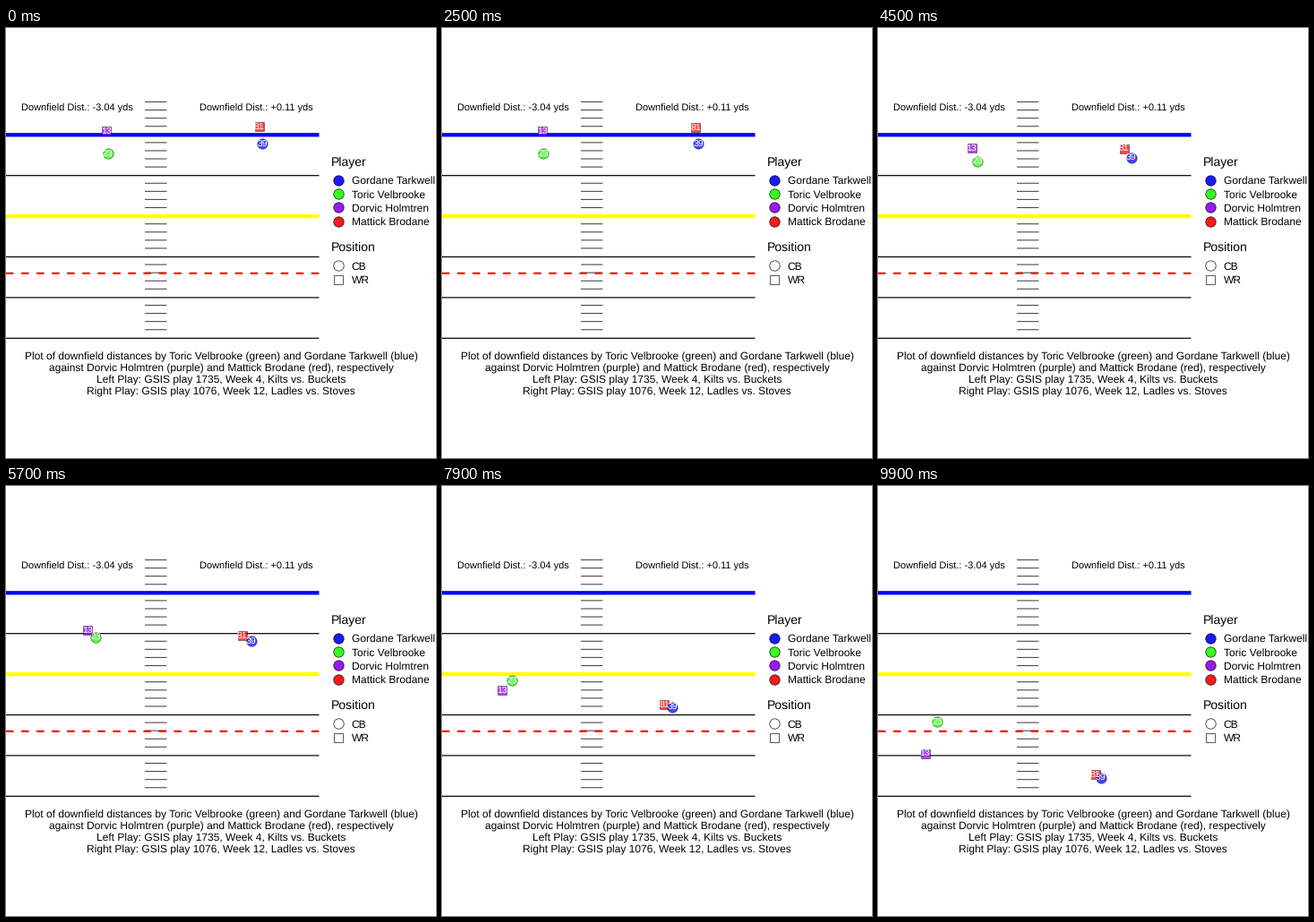
A matplotlib script that plays this animation: 480x480 px, repeating every 10000 ms.

```python
import numpy as np
import matplotlib.pyplot as plt
from matplotlib.animation import FuncAnimation
from matplotlib.colors import to_rgba

SIZE, DPI = 480, 80
PX = 72 / DPI  # points per pixel

plt.rcParams["font.family"] = "Liberation Sans"
plt.rcParams["text.hinting"] = "none"

COLORS = {"blue": "#0000ff", "green": "#21ff06", "purple": "#9000f0", "red": "#ff0000"}
NAMES = {
    "blue": "Gordane Tarkwell",
    "green": "Toric Velbrooke",
    "purple": "Dorvic Holmtren",
    "red": "Mattick Brodane",
}

# Way points at these steps of 200 ms; everyone waits for the first one
KEYS = np.array([10, 17, 23, 36, 50])
ROUTES = [
    ("purple", "13", "s", [(112, 115), (111, 118.5), (104.5, 134), (74, 202), (52.5, 298.5)]),
    ("green", "23", "o", [(113.7, 140), (112.5, 140.5), (111, 148.5), (84, 199.5), (66, 263)]),
    ("red", "81", "s", [(282.7, 110.2), (282.5, 116.5), (274.5, 134.5), (251.8, 215.5), (242.8, 322)]),
    ("blue", "39", "o", [(286, 129.3), (286.2, 131), (282.5, 144.5), (261.7, 218), (248.5, 325.5)]),
]


def route(points, step):
    """Smooth run through the way points, starting from rest."""
    p = np.array(points, float)
    slope = np.gradient(p, KEYS, axis=0)
    slope[0] = 0
    step = max(step, KEYS[0])
    i = min(np.searchsorted(KEYS, step, side="right"), len(KEYS) - 1) - 1
    h = KEYS[i + 1] - KEYS[i]
    s = (step - KEYS[i]) / h
    return ((1 + 2 * s) * (1 - s) ** 2 * p[i] + s * s * (3 - 2 * s) * p[i + 1]
            + h * s * (1 - s) * ((1 - s) * slope[i] - s * slope[i + 1]))


fig = plt.figure(figsize=(SIZE / DPI, SIZE / DPI), dpi=DPI, facecolor="white")
ax = fig.add_axes([0, 0, 1, 1])
ax.set_xlim(0, SIZE)
ax.set_ylim(SIZE, 0)
ax.axis("off")


def label(x, y, text, size, **kw):
    return ax.text(x, y, text, fontsize=size * PX, va="baseline", **kw)


def hline(y, color, width, x0=0, x1=349.5, **kw):
    ax.plot([x0, x1], [y, y], color=color, lw=width * PX, snap=False,
            solid_capstyle="butt", dash_capstyle="butt", **kw)


def marker(x, y, shape, fill, alpha, edge):
    size = 11.4 if shape == "o" else 10.1
    point, = ax.plot([x], [y], shape, ms=size * PX, mew=0.75 * PX, snap=False,
                     mfc=to_rgba(fill, alpha), mec=to_rgba("black", edge), zorder=5)
    return point


# Field: five yards between the long lines
TOP, GAP = 119.3, 45.4
for yard in range(-4, 25):
    if yard % 5:
        hline(TOP + yard * GAP / 5 - 0.5, "#4c4c4c", 1.1, 155, 179.5, zorder=1)
for row in (1, 3, 4, 5):
    hline(TOP + row * GAP, "black", 1.2, zorder=2)
hline(TOP, "#0000ff", 4.27, zorder=3)
hline(TOP + 2 * GAP, "#ffff00", 4.27, zorder=3)
hline(273.8, "#ff0000", 2.13, zorder=3, linestyle=(0, (4, 4)))

label(79.5, 92.3, "Downfield Dist.: -3.04 yds", 11.04, ha="center")
label(279, 92.3, "Downfield Dist.: +0.11 yds", 11.04, ha="center")

# Legend
label(363, 154, "Player", 14)
for i, (key, name) in enumerate(NAMES.items()):
    y = 169.8 + 15.3 * i
    marker(371.3, y, "o", COLORS[key], 0.9, 0.85)
    label(385.7, y + 4.4, name, 12)
label(363, 249, "Position", 14)
for y, shape, name in ((265.2, "o", "CB"), (280.5, "s", "WR")):
    marker(371.3, y, shape, "white", 0, 0.85)
    label(385.7, y + 4.4, name, 12)

caption = [
    f"Plot of downfield distances by {NAMES['green']} (green) and {NAMES['blue']} (blue)",
    f"against {NAMES['purple']} (purple) and {NAMES['red']} (red), respectively",
    "Left Play: GSIS play 1735, Week 4, Kilts vs. Buckets",
    "Right Play: GSIS play 1076, Week 12, Ladles vs. Stoves",
]
for i, line in enumerate(caption):
    label(240, 370.3 + 12.96 * i, line, 12, ha="center")

# Players: all numbers sit above all markers
actors = []
for key, number, shape, points in ROUTES:
    point = marker(0, 0, shape, COLORS[key], 0.72, 0.55)
    text = label(0, 0, number, 10.5, ha="center", color="white", zorder=7)
    actors.append((point, text, points))


def update(frame):
    step = (frame + 1) // 2
    for point, text, points in actors:
        x, y = route(points, step)
        point.set_data([x], [y])
        text.set_position((x, y + 3.8))


anim = FuncAnimation(fig, update, frames=100, interval=100, repeat=True, repeat_delay=0)
plt.show()
```
